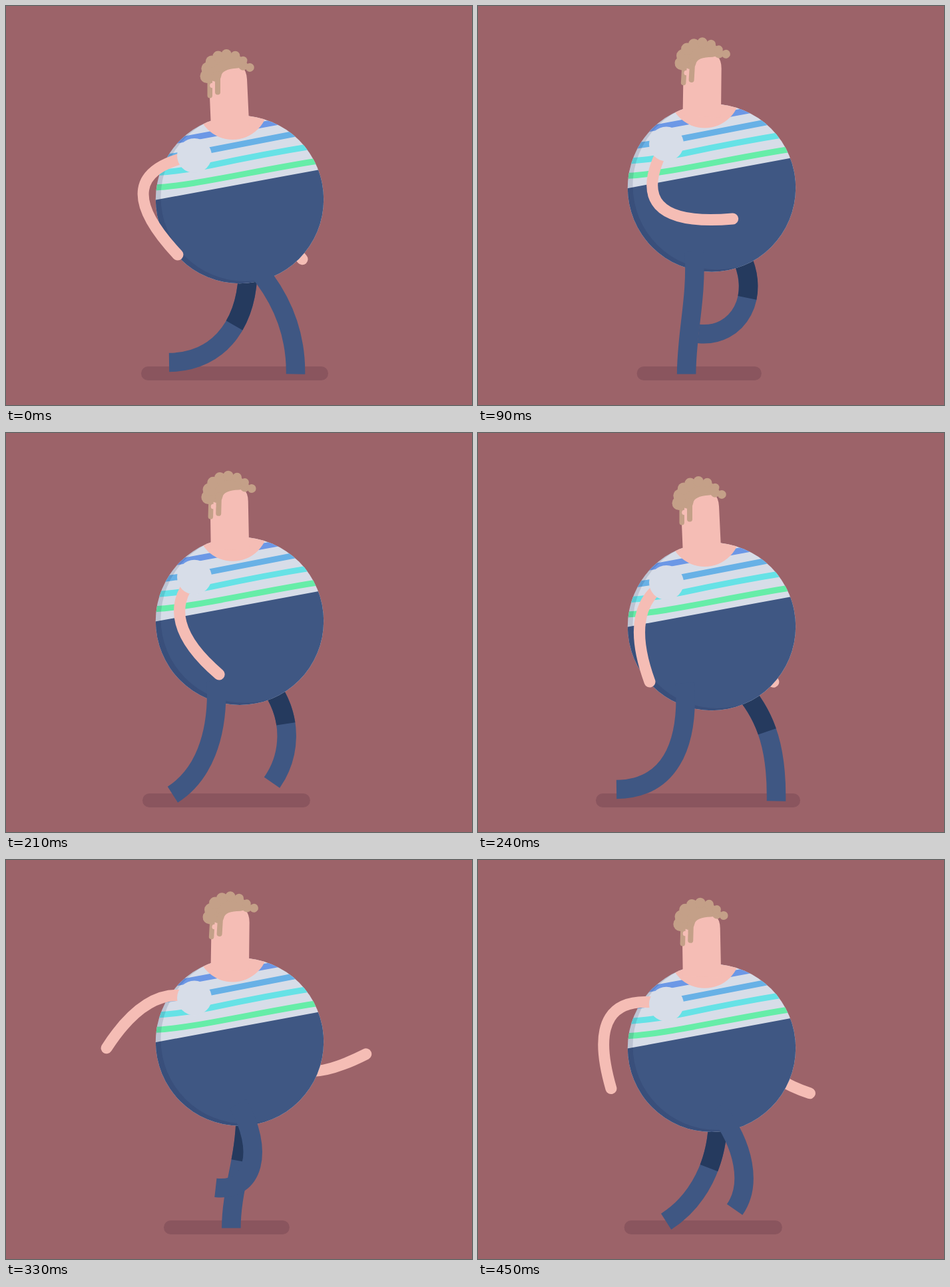
These frames come from a looping animation (700x600 px, 0.48 s). An HTML page:

```html
<!DOCTYPE html>
<html lang="en">
<head>
<meta charset="utf-8">
<title>Walk cycle</title>
<style>
  html, body { margin: 0; width: 100%; height: 100%; overflow: hidden; background: #9c6369; }
  svg { display: block; width: 700px; height: 600px; }
  .skin { fill: #f5bdb5; }
  .hair { fill: #c4a088; }
  .arm { fill: none; stroke: #f5bdb5; stroke-width: 17; stroke-linecap: round; }
  .leg { fill: none; stroke: #3f5783; stroke-width: 28.5; }
  .stripes { fill: none; stroke-width: 9; }
</style>
</head>
<body>
<svg viewBox="0 0 700 600">
  <defs>
    <clipPath id="belly"><circle cx="351" cy="291" r="126.200"/></clipPath>
  </defs>
  <rect id="shadow" y="542" height="21" rx="10.5" fill="#8a555e"/>
  <path id="backArm" class="arm"/>
  <path id="backLeg" class="leg"/>
  <path id="backThigh" class="leg" style="stroke:#253a5e" pathLength="100"/>

  <g id="body">
    <g clip-path="url(#belly)">
      <rect x="220" y="160" width="262" height="262" fill="#d7dde8"/>
      <g class="stripes">
        <path stroke="#6c98e6" d="M250 203.500L415 173"/>
        <path stroke="#68b1e6" d="M235 228Q285 221 308 216.500L445 190"/>
        <path stroke="#66e2e6" d="M220 251Q262 249 308 239.500Q390 222 465 210"/>
        <path stroke="#66eda8" d="M220 273C275 272 380 246 480 231"/>
      </g>
      <path fill="#3f5783" d="M220 292.500L482 244V422H220Z"/>
      <path fill="#101b48" fill-opacity=".13" fill-rule="evenodd"
        d="M200 140H500V440H200ZM232.500 287.500a126.500 126.500 0 0 0 253 0a126.500 126.500 0 0 0 -253 0Z"/>
      <circle class="skin" cx="340.500" cy="147.500" r="53.500"/>
    </g>
    <g id="head">
      <path class="skin" d="M308 184L305 112Q308 84 335 84Q361 86 362 110L365.500 184Z"/>
      <g id="curls" class="hair">
        <path d="M314 104Q316 86 347 84" fill="none" stroke="#c4a088" stroke-width="19" stroke-linecap="round"/>
        <rect x="302.500" y="108" width="7.500" height="30.500" rx="3.700"/>
        <rect x="314" y="98" width="8" height="35.500" rx="4"/>
        <g id="fringe"><circle cx="356" cy="90" r="7"/><circle cx="366" cy="93" r="6.500"/></g>
      </g>
      <circle class="skin" cx="310" cy="119.500" r="3.800"/>
    </g>
  </g>

  <path id="frontLeg" class="leg"/>
  <path id="frontArm" class="arm"/>
  <circle id="sleeve" cx="283" cy="225" r="26" fill="#d7dde8"/>
</svg>
<script>
const $ = id => document.getElementById(id);
const setAll = (node, attrs) => { for (const k in attrs) node.setAttribute(k, attrs[k]); };
const set = (id, attrs) => setAll($(id), attrs);

const FRAME = 30, FRAMES = 16;

// Curls shrink from the nape round to the forehead.
for (let i = 0; i < 7; i++) {
  const angle = (180 + 23 * i) * Math.PI / 180;
  const r = 10.5 - .7 * i, reach = 38.5 + .5 * i - r;
  const curl = document.createElementNS('http://www.w3.org/2000/svg', 'circle');
  setAll(curl, { cx: 330 + reach * Math.cos(angle), cy: 105.5 + reach * Math.sin(angle), r });
  $('curls').append(curl);
}

// Poses are contact, passing, contact, passing:
// eases out into a passing pose and in towards a contact pose.
function key(f, ...values) {
  f = (f + FRAMES) % FRAMES;
  const i = Math.floor(f / 4), u = f / 4 - i;
  const e = i % 2 ? u * u : 1 - (1 - u) ** 2;
  const a = values[i % values.length], b = values[(i + 1) % values.length];
  return a + (b - a) * e;
}

// Both legs bend alike; only the hip and foot positions differ.
function leg(f, hip, foot) {
  const knee = hip + key(f, 45, 2, 6, 42), ankle = foot + key(f, 1, 0, 78, 57);
  return `M${hip} ${key(f, 380, 368, 376, 366)}
    C${knee} ${key(f, 427, 439, 473, 434)}
    ${ankle} ${key(f, 483, 491, 535, 497)}
    ${foot} ${key(f, 553.5, 553.5, 536, 490)}`;
}

// Hangs from the shoulder at an angle in degrees and bows to the left.
function arm(f, x, y, length, degrees) {
  const a = degrees * Math.PI / 180, s = Math.sin(a), c = Math.cos(a);
  const along = length * .32;
  const bow = 95 + 48 * Math.cos((f - 1.7) * Math.PI / 8);
  return `M${x} ${y}Q${x - s * along - c * bow} ${y + c * along - s * bow} ${x - s * length} ${y + c * length}`;
}

function draw(f) {
  const bob = key(f, 0, -18.7);
  const left = key(f, 203, 241, 177, 241), right = key(f, 484, 422);
  set('shadow', { x: left, width: right - left });
  set('body', { transform: `translate(0 ${bob})` });
  set('sleeve', { transform: `translate(0 ${bob})` });
  set('head', { transform: `rotate(${key(f, 0, 3.5)} 337 175)` });
  set('fringe', { transform: `rotate(${-11 + 9.5 * Math.cos(f * Math.PI / 4 - .3)} 348 85)` });

  set('frontLeg', { d: leg(f, key(f, 363, 322, 311, 351), key(f, 435, 305, 208, 322)) });

  const b = f + FRAMES / 2;
  const d = leg(b, key(b, 392, 357, 363, 392), key(b, 448, 331, 245, 337));
  set('backLeg', { d });
  set('backThigh', { d, 'stroke-dasharray': `${key(b, 43.5, 45.5, 47.7, 42.5)} 200` });

  set('frontArm', { d: arm(f, 282, 225 + bob, 151, key(f, 9.15, -45.2, 9.15, 63.5)) });
  const reach = 140 - 9 * Math.max(0, Math.cos((f - 9) * Math.PI / 8)) ** 4;
  set('backArm', { d: arm(b, 420, 243 + bob, reach, key(f, -10.3, 44, -10.3, -64.6)) });
}

const start = performance.now();
function tick() {
  draw(Math.floor((performance.now() - start) / FRAME) % FRAMES);
  requestAnimationFrame(tick);
}
tick();
</script>
</body>
</html>
```
